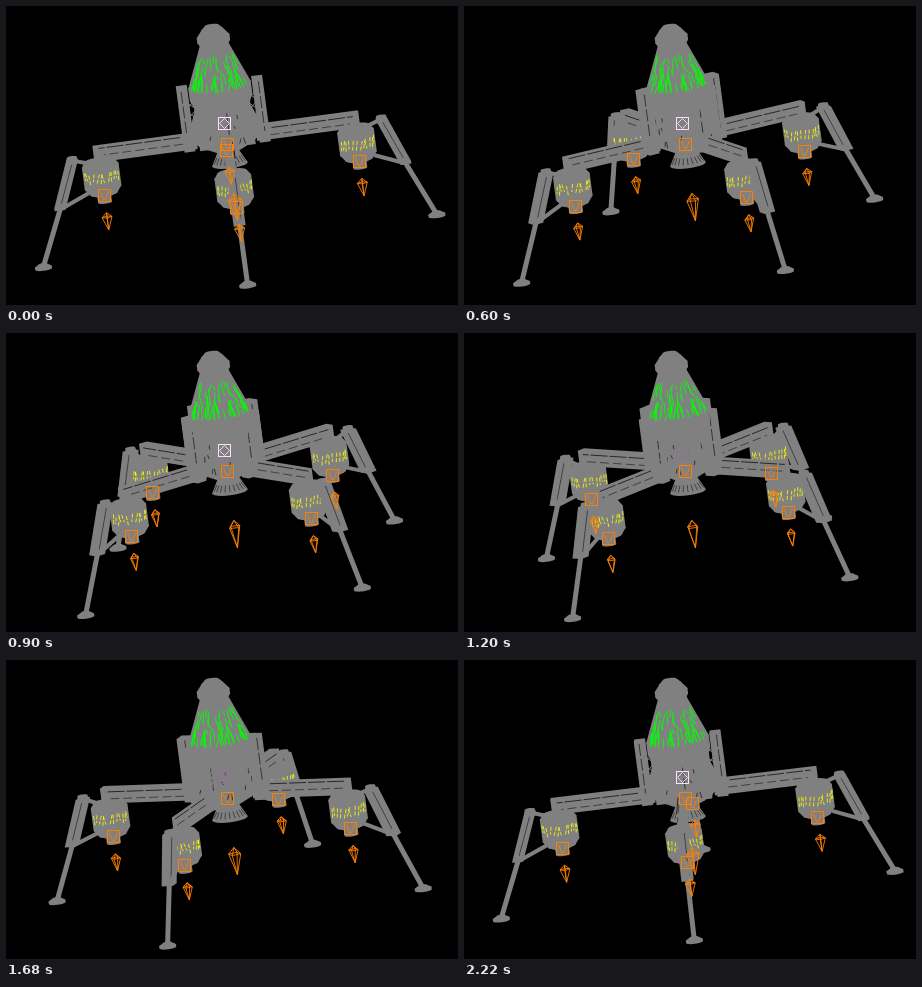
An HTML page with a canvas for the animation above (2280 ms loop, 452 by 299 pixels).

```html
<!DOCTYPE html>
<html lang="en">
<head>
<meta charset="utf-8">
<title>Lander turntable</title>
<style>
html, body { margin: 0; width: 100%; height: 100%; overflow: hidden; background: #000; }
canvas { display: block; }
</style>
</head>
<body>
<canvas id="stage" width="452" height="299"></canvas>
<script>
const ctx = document.getElementById('stage').getContext('2d');
const STEP = 60, STEPS = 38, QUARTER = Math.PI / 2;
const GREY = '#808080', ORANGE = '#ff8000', GREEN = '#00ff00', YELLOW = '#ffff00';
const ORIGIN = [218.6, 117.6], ROLL = 7.53 * Math.PI / 180, PITCH = 0.2246;
const cr = Math.cos(ROLL), sr = Math.sin(ROLL);

// Turntable angle in degrees at a few steps
const TURN = [[0, 0.5], [20, 48.7], [28, 66.7], [37, 87.2], [38, 90.5]];

let seed = 7;
const rnd = (lo = 0, hi = 1) => {
  seed = (seed * 16807) % 2147483647;
  return lo + (hi - lo) * seed / 2147483647;
};
const make = (n, f) => Array.from({ length: n }, (_, i) => f(i));

const stripes = make(44, () => {
  const top = rnd(-73, -44);
  return { a: rnd(0, QUARTER), top, end: Math.min(-38, top + rnd(4, 16)), skew: rnd(-0.12, 0.12) };
});
const scratches = make(7, () => ({ q: rnd(-26, 26), v: rnd(-14, 12), len: rnd(3, 7), lean: rnd(-3, 3) }));
const ticks = make(30, i => ({ a: i * Math.PI / 15, v: rnd(29, 32), len: rnd(7, 11), lean: rnd(-0.12, 0.2) }));

// Orthographic view: x right, v down the craft's axis, z towards the viewer
function project(x, v, z) {
  const d = v + z * PITCH;
  return [ORIGIN[0] + x * cr + d * sr, ORIGIN[1] - x * sr + d * cr];
}

// Point at radius r, height v and sideways offset q on the arm with angle a
function at(a, r, v, q = 0) {
  const s = Math.sin(a), c = Math.cos(a);
  return project(r * s + q * c, v, r * c - q * s);
}

function hull(points) {
  const pts = points.slice().sort((p, q) => p[0] - q[0] || p[1] - q[1]);
  const half = list => {
    const out = [];
    for (const p of list) {
      while (out.length > 1) {
        const [b, c] = out.slice(-2);
        if ((c[0] - b[0]) * (p[1] - b[1]) - (c[1] - b[1]) * (p[0] - b[0]) > 0) break;
        out.pop();
      }
      out.push(p);
    }
    return out.slice(0, -1);
  };
  return half(pts).concat(half(pts.slice().reverse()));
}

function trace(pts, close) {
  ctx.beginPath();
  pts.forEach(p => ctx.lineTo(p[0], p[1]));
  if (close) ctx.closePath();
}

function solid(points, color = GREY) {
  trace(hull(points), true);
  ctx.fillStyle = color;
  ctx.fill();
}

function line(pts, color = GREY, width = 1, close = false) {
  trace(pts, close);
  ctx.strokeStyle = color;
  ctx.lineWidth = width;
  ctx.stroke();
}

function dashed(pattern, ...args) {
  ctx.setLineDash(pattern);
  line(...args);
  ctx.setLineDash([]);
}

// Ring of radius r at height v around the point at radius R on arm a
function ring(a, R, r, v) {
  const x = R * Math.sin(a), z = R * Math.cos(a);
  return make(24, i => {
    const t = i * Math.PI / 12;
    return project(x + r * Math.sin(t), v, z + r * Math.cos(t));
  });
}

// Stack of [radius, height] rings
function lathe(a, R, profile) {
  for (let i = 1; i < profile.length; i++) {
    solid([...ring(a, R, ...profile[i - 1]), ...ring(a, R, ...profile[i])]);
  }
}

// Beam from [r, v] to [r, v], given radial and vertical half sizes and half breadth
function beam(a, from, to, dr, dv, q) {
  const pts = [];
  for (const [r, v] of [from, to])
    for (const i of [-1, 1])
      for (const j of [-q, q]) pts.push(at(a, r + dr * i, v + dv * i, j));
  solid(pts);
}

function arm(a) {
  beam(a, [30, 13], [134, 13], 0, 7.5, 5);
  const near = Math.sin(2 * a) > 0 ? 5 : -5;
  dashed([17, 2], [at(a, 46, 9, near), at(a, 128, 9, near)], '#000', 0.7);
  dashed([9, 4], [at(a, 44, 16, near), at(a, 124, 16, near)], '#000', 0.5);
}

function leg(a) {
  beam(a, [156, 16], [174.5, 63], 5.5, 0, 6);
  lathe(a, 156, [[5, 13], [6, 19]]);
  line([at(a, 157, 20, 2), at(a, 173, 59, 2)], '#000', 0.5);
  line([at(a, 142, 21), at(a, 157, 16)], GREY, 4);
  line([at(a, 144, 51), at(a, 173, 63)], GREY, 4);
  line([at(a, 172, 58), at(a, 198.5, 118)], GREY, 5);
  lathe(a, 198.5, [[4, 115], [8.5, 118], [8.5, 120]]);
}

function pod(a) {
  const R = 128.8;
  lathe(a, R, [[15, 20], [18.5, 25], [18.5, 47], [14, 53], [7, 56], [7, 62]]);
  const x = R * Math.sin(a), z = R * Math.cos(a);
  const skin = (b, v) => project(x + 18 * Math.sin(b), v, z + 18 * Math.cos(b));
  for (const t of ticks) {
    const b = a + t.a;
    if (Math.cos(b) < 0.25) continue;
    dashed([4, 1.5], [skin(b + t.lean, t.v), skin(b, t.v + t.len)], YELLOW, 0.8);
  }
}

function limb(a) {
  const parts = [arm, pod, leg];
  if (Math.cos(a) < 0) parts.reverse();
  parts.forEach(f => f(a));
}

function strut(a) {
  beam(a, [38, -42], [38, 22], 5.5, 0, 7);
  const q = Math.cos(a) > 0 ? 3 : -3;
  dashed([12, 3], [at(a, 39, -38, q), at(a, 39, 12, q)], '#000', 0.6);
  for (const v of [-28, -18, -8]) {
    line([at(a, 26, v), at(a, 36, v + 9)]);
    line([at(a, 26, v + 9, 5), at(a, 36, v, 5)]);
  }
}

function body(turn) {
  const corners = [];
  for (let k = 0; k < 4; k++)
    for (const v of [-37, 18]) corners.push(at(turn + k * QUARTER, 28, v, 28));
  solid(corners);
  lathe(0, 0, [[29, -14], [33, -4], [34, 14], [28, 19], [11, 28], [18, 41]]);
  for (let k = 0; k < 4; k++) {
    const a = turn + k * QUARTER;
    if (Math.cos(a) < 0.15) continue;
    for (const s of scratches) line([at(a, 28, s.v, s.q), at(a, 28, s.v + s.len, s.q + s.lean)], '#000', 0.6);
  }
  for (let i = -4; i <= 4; i++) {
    const b = i * 0.3;
    line([at(b, 13, 32), at(b, 17, 38)], '#000', 0.5);
  }
}

function nose(turn) {
  lathe(0, 0, [[7, -99], [11, -95], [16.5, -88], [16.5, -83], [14.5, -80], [31.5, -39], [31.5, -27], [27, -16]]);
  const radius = v => 14 + (v + 80) * 17 / 43;
  for (let k = 0; k < 4; k++) {
    for (const s of stripes) {
      const a = turn + s.a + k * QUARTER;
      if (Math.cos(a) < 0.3) continue;
      line([at(a, radius(s.top), s.top), at(a + s.skew, radius(s.end), s.end)], GREEN, 0.9);
    }
  }
}

function box(x, y, color) {
  const cx = Math.floor(x) + 0.5, cy = Math.floor(y) + 0.5;
  ctx.strokeStyle = color;
  ctx.lineWidth = 1;
  ctx.strokeRect(cx - 6, cy - 6, 12, 12);
  return [cx, cy];
}

function thruster(p) {
  const [x, y] = box(...p, ORANGE);
  line([[x - 4, y - 4], [x - 1, y + 4], [x + 1, y + 4], [x + 4, y - 4]], ORANGE, 0.8);
}

function flame(a, R, top, waist, tip, r) {
  const mid = make(4, i => {
    const t = a + i * QUARTER;
    return project(R * Math.sin(a) + r * Math.sin(t), waist, R * Math.cos(a) + r * Math.cos(t));
  });
  line(mid, ORANGE, 0.9, true);
  for (const p of mid) line([at(a, R, top), p, at(a, R, tip)], ORANGE, 0.9);
}

function beacon(dim) {
  const [x, y] = box(218, 117, dim ? '#84778a' : '#ffdcff');
  line([[x, y - 5], [x + 5, y], [x, y + 5], [x - 5, y]], dim ? '#95709a' : '#ffdcff', 0.9, true);
}

function angle(n) {
  const i = TURN.findIndex(k => k[0] > n);
  const [n0, a0] = TURN[i - 1], [n1, a1] = TURN[i];
  return (a0 + (a1 - a0) * (n - n0) / (n1 - n0)) * Math.PI / 180;
}

function draw(n) {
  const turn = angle(n);
  const arms = make(4, k => turn + k * QUARTER).sort((a, b) => Math.cos(a) - Math.cos(b));
  ctx.fillStyle = '#000';
  ctx.fillRect(0, 0, 452, 299);

  const back = arms.filter(a => Math.cos(a) < 0), front = arms.filter(a => Math.cos(a) >= 0);
  back.forEach(a => { limb(a); strut(a); });
  body(turn);
  front.forEach(strut);
  nose(turn);
  front.forEach(limb);

  beacon(n % 12 >= 4 && n % 12 <= 8);
  thruster(project(0, 21.5, 0));
  flame(turn, 0, 70.5, 77, 98, 6.5);
  for (const a of arms) {
    thruster(at(a, 128.8, 55.7));
    flame(a, 128.8, 72.7, 77, 90, 5);
  }
}

function tick(now) {
  draw(Math.floor(now / STEP) % STEPS);
  requestAnimationFrame(tick);
}
draw(0);
requestAnimationFrame(tick);
</script>
</body>
</html>
```
